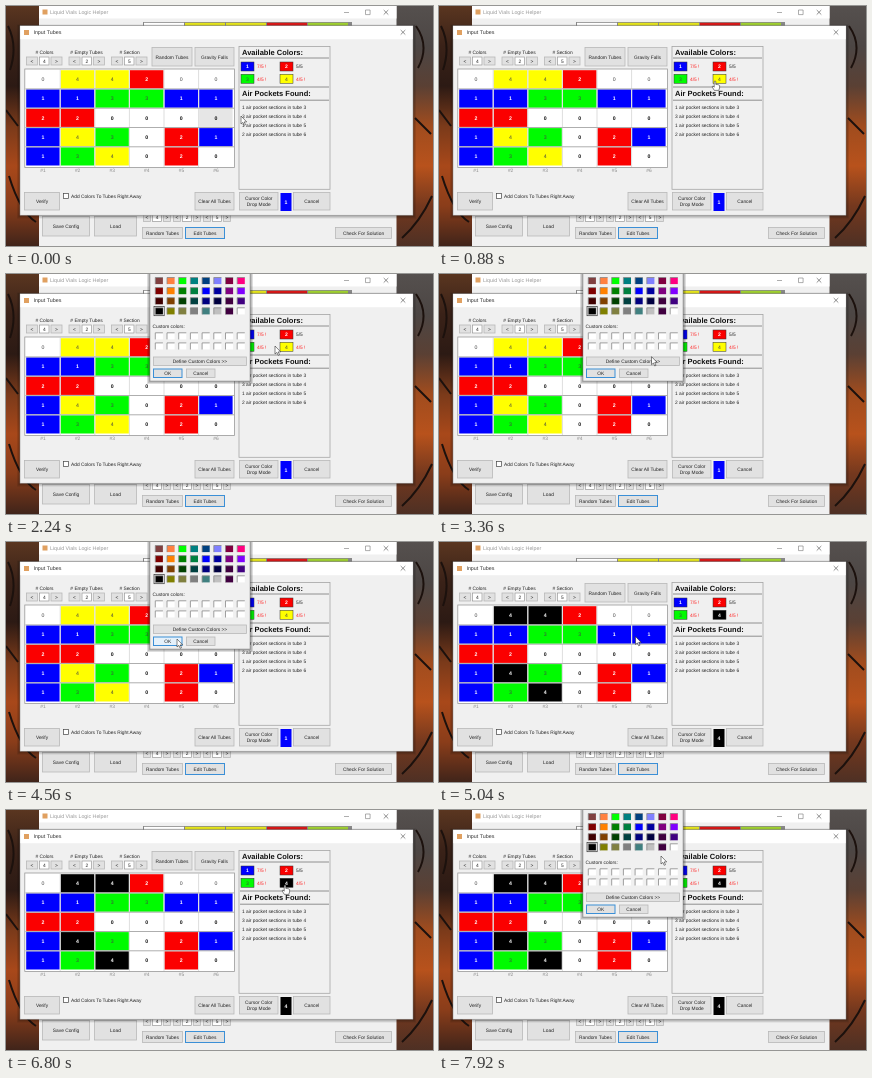
An HTML page that plays this animation: 427 px wide and 240 px high, repeating every 8 s.

```html
<!DOCTYPE html>
<html lang="en">
<head>
<meta charset="utf-8">
<title>Input Tubes</title>
<style>
  html, body { margin: 0; width: 100%; height: 100%; overflow: hidden; background: #2a1a15; }
  svg { display: block; width: 100vw; height: 100vh; }
  text { font-family: "Liberation Sans", Arial, sans-serif; text-rendering: geometricPrecision; white-space: pre; }
</style>
</head>
<body>
<svg id="stage" viewBox="0 0 427 240" preserveAspectRatio="none"></svg>
<script>
const NS = "http://www.w3.org/2000/svg";
const stage = document.getElementById("stage");
const LOOP = 8000, STEP = 80;
const FACE = "#f0f0f0", BLUE = "#0000ff", RED = "#fb0000", GREEN = "#00fb00", YELLOW = "#ffff00";
const INK = "#222";

function add(parent, tag, attrs) {
  const el = document.createElementNS(NS, tag);
  for (const k in attrs) el.setAttribute(k, attrs[k]);
  parent.appendChild(el);
  return el;
}
const group = parent => add(parent, "g", {});
const rect = (p, x, y, width, height, fill, extra) => add(p, "rect", { x, y, width, height, fill, ...extra });
const path = (p, d, extra) => add(p, "path", { d, fill: "none", ...extra });

function label(p, str, x, y, opt = {}) {
  const el = add(p, "text", { x, y, "font-size": 4.85, fill: INK, ...opt });
  el.textContent = str;
  return el;
}
const centered = (p, str, x, y, opt) => label(p, str, x, y, { "text-anchor": "middle", ...opt });

function button(p, x, y, w, h, lines, focus) {
  const g = group(p);
  rect(g, x + .5, y + .5, w - 1, h - 1, "#e1e1e1", { stroke: focus ? "#3b8fd6" : "#b8b8b8", "stroke-width": focus ? 1 : .8 });
  const list = [].concat(lines);
  list.forEach((s, i) => centered(g, s, x + w / 2, y + h / 2 + 1.8 + (i - (list.length - 1) / 2) * 6));
  return g;
}

function spinner(p, x, y, value, bw, iw) {
  button(p, x, y, bw, 9, "<");
  rect(p, x + bw + 1.5, y + .5, iw, 8, "#fff", { stroke: "#999", "stroke-width": .7 });
  centered(p, value, x + bw + 1.5 + iw / 2, y + 6.3);
  button(p, x + bw + iw + 3, y, bw, 9, ">");
}

function appIcon(p, x, y) {
  rect(p, x, y, 5, 5, "#e0a060");
}

function cross(p, x, y) {
  path(p, `M${x - 2.3} ${y - 2.3}l4.6 4.6m0 -4.6l-4.6 4.6`, { stroke: "#444", "stroke-width": .6 });
}

function shade(p, id, x, w, colors) {
  const g = add(p, "linearGradient", { id, x1: 0, y1: 0, x2: 0, y2: 1 });
  colors.forEach((c, i) => add(g, "stop", { offset: i / (colors.length - 1), "stop-color": c }));
  rect(p, x, 0, w, 240, `url(#${id})`);
}

function wallpaper(p) {
  shade(p, "left", 0, 34, ["#5a3620", "#3a2218", "#2c1a14", "#7a3a1a", "#a8481a", "#8a3d1a", "#40241a"]);
  shade(p, "right", 390, 37, ["#55504e", "#4c4644", "#5a4034", "#a04c1e", "#b8521c", "#74381e", "#4e3024"]);
  path(p, "M2 20Q12 40 4 64M0 104L12 120M3 170Q14 206 30 216M410 20Q424 40 412 62M409 112L425 128M396 232Q414 216 426 190",
    { stroke: "#1c110d", "stroke-width": 2 });
}

function backWindow(p) {
  rect(p, 33, 0, 357.5, 240, FACE);
  rect(p, 33, 0, 357.5, 12.5, "#fff");
  appIcon(p, 36.5, 3.5);
  label(p, "Liquid Vials Logic Helper", 44, 8.4, { "font-size": 5.3, fill: "#999" });
  path(p, "M338 6.5h5M359.5 4h4.6v4.6h-4.6z", { stroke: "#777", "stroke-width": .6 });
  cross(p, 380, 6.3);
  rect(p, 137, 16, 209, 4, "#888");
  ["#fff", "#e4e41c", "#e4e41c", "#d81818", "#9fd030"].forEach((c, i) =>
    rect(p, 138 + i * 41, 16.8, 40, 3.2, c));
  button(p, 36, 210, 48, 20.5, "Save Config");
  button(p, 88, 210, 43, 20.5, "Load");
  ["4", "2", "5"].forEach((v, i) => spinner(p, 137 + i * 30, 207, v, 8, 9));
  button(p, 136, 221, 41, 12, "Random Tubes");
  button(p, 179, 221, 40, 12, "Edit Tubes", true);
  button(p, 329, 221, 57, 12, "Check For Solution");
}

// Parts that turn from yellow to black
const recolored = [];

function chip(p, x, y, w, h, n, size, edge) {
  const fill = ["#fff", BLUE, RED, GREEN, YELLOW][n];
  const box = rect(p, x, y, w, h, fill, edge);
  const bright = n === 1 || n === 2;
  const txt = centered(p, n, x + w / 2, y + h / 2 + size * .36, {
    "font-size": size, fill: bright ? "#fff" : "#444", "font-weight": bright ? 700 : 400
  });
  if (n === 4) recolored.push([box, txt]);
  return [box, txt];
}

let hotCell;
function tubes(p) {
  const cw = 34.6, ch = 19.3;
  rect(p, 18.8, 63, 209.7, 98.5, "#fff", { stroke: "#999", "stroke-width": .8 });
  const rows = ["044200", "113311", "220000", "143021", "134020"];
  rows.forEach((row, r) => [...row].forEach((d, c) => {
    const n = +d, [box, txt] = chip(p, 20.2 + c * cw, 64.2 + r * ch, cw - 1.2, ch - 1.2, n, 5.2);
    if (!n && r) { txt.setAttribute("font-weight", 700); txt.setAttribute("fill", "#111"); }
    if (r === 2 && c === 5) hotCell = box;
  }));
  for (let i = 1; i < 5; i++)
    path(p, `M19.5 ${63.6 + i * ch}H228`, { stroke: "#777", "stroke-width": .6 });
  for (let i = 1; i < 6; i++)
    path(p, `M${19.6 + i * cw} 63.5V161`, { stroke: "#bbb", "stroke-width": .5 });
  for (let i = 0; i < 6; i++) centered(p, "#" + (i + 1), 37 + i * cw, 165.5, { fill: "#888" });
}

function inputWindow(p) {
  for (let i = 3; i > 0; i--) rect(p, 14 - i, 20 - i / 2, 393 + 2 * i, 189.5 + 1.5 * i, "#000", { opacity: .1 });
  rect(p, 14, 19.8, 393, 189.4, FACE, { stroke: "#888", "stroke-width": .5 });
  rect(p, 14.3, 20, 392.4, 13.2, "#fff");
  appIcon(p, 18, 24);
  label(p, "Input Tubes", 27.4, 28.4, { "font-size": 5.35, fill: "#333" });
  cross(p, 397, 26.3);

  [["# Colors", 38.5, 20, "4"], ["# Empty Tubes", 80.5, 62.5, "2"], ["# Section", 123.5, 105, "5"]].forEach(([s, x, left, v]) => {
    centered(p, s, x, 47.5);
    spinner(p, left, 50.5, v, 12, 9.5);
  });
  button(p, 145.5, 41, 41, 19.5, "Random Tubes");
  button(p, 188.5, 41, 40, 19.5, "Gravity Falls");
  tubes(p);

  rect(p, 233, 40.5, 91, 142.8, FACE, { stroke: "#a5a5a5", "stroke-width": .8 });
  const head = { "font-size": 7.5, "font-weight": 700, fill: "#111" };
  label(p, "Available Colors:", 236, 48.6, head);
  label(p, "Air Pockets Found:", 236, 90.2, head);
  path(p, "M234 52H323M234 81H323M234 94.2H323", { stroke: "#777", "stroke-width": .8 });
  const edge = { stroke: "#333", "stroke-width": .5 };
  [[1, 235, 56, "7/5 !"], [2, 274, 56, "5/5"], [3, 235, 68.3, "4/5 !"], [4, 274, 68.3, "4/5 !"]].forEach(([n, x, y, s]) => {
    chip(p, x, y, 13, 9, n, 5, edge);
    label(p, s, x + 16, y + 6.4, { fill: n === 2 ? INK : "#ff2020" });
  });
  [[1, 3], [3, 4], [1, 5], [2, 6]].forEach(([n, tube], i) =>
    label(p, `${n} air pocket sections in tube ${tube}`, 236, 103.2 + i * 9));

  button(p, 18, 186, 36, 18.5, "Verify");
  rect(p, 57.4, 187.4, 5, 5, "#fff", { stroke: "#444", "stroke-width": .7 });
  label(p, "Add Colors To Tubes Right Away", 65, 191.9);
  button(p, 188.5, 186, 40, 18.5, "Clear All Tubes");
  button(p, 233, 186, 39.5, 18.5, ["Cursor Color", "Drop Mode"]);
  button(p, 287, 186, 37.5, 18.5, "Cancel");
}

function colorDialog(p) {
  const g = group(p);
  for (let i = 3; i > 0; i--) rect(g, 144 - i, 0, 100 + 2 * i, 107 + i, "#000", { opacity: .13 });
  rect(g, 144, -2, 100, 109, FACE, { stroke: "#888", "stroke-width": .5 });
  const palette = [
    "804040 ff8040 00ff00 008080 004080 8080ff 800040 ff0080",
    "800000 ff8000 008000 008040 0000ff 0000a0 800080 8000ff",
    "400000 804000 004000 004040 000080 000040 400040 400080",
    "000000 808000 808040 808080 408080 c0c0c0 400040 ffffff"
  ];
  const well = (x, y, fill) => {
    rect(g, x, y, 7.6, 6.6, fill);
    path(g, `M${x} ${y + 6.6}v-6.6h7.6`, { stroke: "#888", "stroke-width": .8 });
  };
  palette.forEach((row, r) => row.split(" ").forEach((c, i) =>
    well(149.3 + i * 11.7, 3.5 + r * 10.1, "#" + c)));
  rect(g, 148, 32.5, 10.2, 9.2, "none", { stroke: "#333", "stroke-width": .7 });
  label(g, "Custom colors:", 146.5, 54);
  for (let i = 0; i < 16; i++)
    well(149.3 + i % 8 * 11.7, 58.8 + (i >> 3) * 10.1, "#fff");
  button(g, 147, 82.5, 94, 9.5, "Define Custom Colors >>");
  const ok = button(g, 147, 94.5, 29.5, 9.5, "OK", true);
  button(g, 180, 94.5, 29.5, 9.5, "Cancel");
  return { root: g, okFace: ok.firstChild };
}

wallpaper(stage);
backWindow(stage);
inputWindow(stage);
const dropBox = rect(stage, 274.5, 187, 11, 18, BLUE);
const dropText = centered(stage, "1", 280, 198, { fill: "#fff", "font-weight": 700, "font-size": 5.2 });
const dialog = colorDialog(stage);

const cursor = group(stage);
const outline = { fill: "#fff", stroke: "#222", "stroke-width": .55, "stroke-linejoin": "round" };
const arrow = path(cursor, "M0 0V8L1.9 6.4L3.2 9.3L4.5 8.7L3.2 5.9H5.7Z", outline);
const hand = path(cursor, "M-.8 .4Q0 -.5 .8 .4V3.4L2.2 3.5L3.6 3.9L4.6 4.6V7L3.7 9.4H-.6L-2.7 6.2Q-3 5 -1.9 5.2L-.8 6.2Z", outline);

// time, x, y of the pointer tip
const route = [
  [0, 235, 110], [160, 237, 107], [480, 262, 89], [800, 276, 75], [1440, 276, 75],
  [1920, 269, 72], [2800, 269, 72], [3200, 226, 78], [3680, 174, 96], [3920, 171, 97],
  [4800, 171, 97], [5280, 222, 92], [5840, 262, 81], [6320, 270, 77], [6720, 279, 75],
  [7120, 279, 75], [7600, 244, 58], [7920, 222, 46], [8000, 222, 46]
];

function pointer(t) {
  let i = 0;
  while (i < route.length - 2 && t >= route[i + 1][0]) i++;
  const [t0, x0, y0] = route[i], [t1, x1, y1] = route[i + 1];
  const k = (t - t0) / (t1 - t0), e = k * k * (3 - 2 * k);
  return [x0 + (x1 - x0) * e, y0 + (y1 - y0) * e];
}

const within = (t, a, b) => t >= a && t < b;
const show = (el, on) => el.setAttribute("visibility", on ? "visible" : "hidden");

function render(t) {
  const [x, y] = pointer(t);
  const open = within(t, 1440, 4800) || t >= 7040;
  const black = t >= 4800;
  const overChip = !open && y < 77.5 && x > 273;
  const overOk = open && x < 176 && y > 94;

  cursor.setAttribute("transform", `translate(${x.toFixed(2)} ${y.toFixed(2)})`);
  show(arrow, !overChip);
  show(hand, overChip);
  show(dialog.root, open);
  dialog.okFace.setAttribute("fill", overOk ? "#e5f1fb" : "#e1e1e1");
  hotCell.setAttribute("fill", t < 160 ? "#e6e6e6" : "#fff");
  for (const [box, txt] of recolored) {
    box.setAttribute("fill", black ? "#000" : YELLOW);
    txt.setAttribute("fill", black ? "#fff" : "#444");
    txt.setAttribute("font-weight", black ? 700 : 400);
  }
  dropBox.setAttribute("fill", black ? "#000" : BLUE);
  dropText.textContent = black ? "4" : "1";
}

const start = performance.now();
function tick() {
  const t = (performance.now() - start) % LOOP;
  render(Math.floor(t / STEP) * STEP);
  requestAnimationFrame(tick);
}
tick();
</script>
</body>
</html>
```
